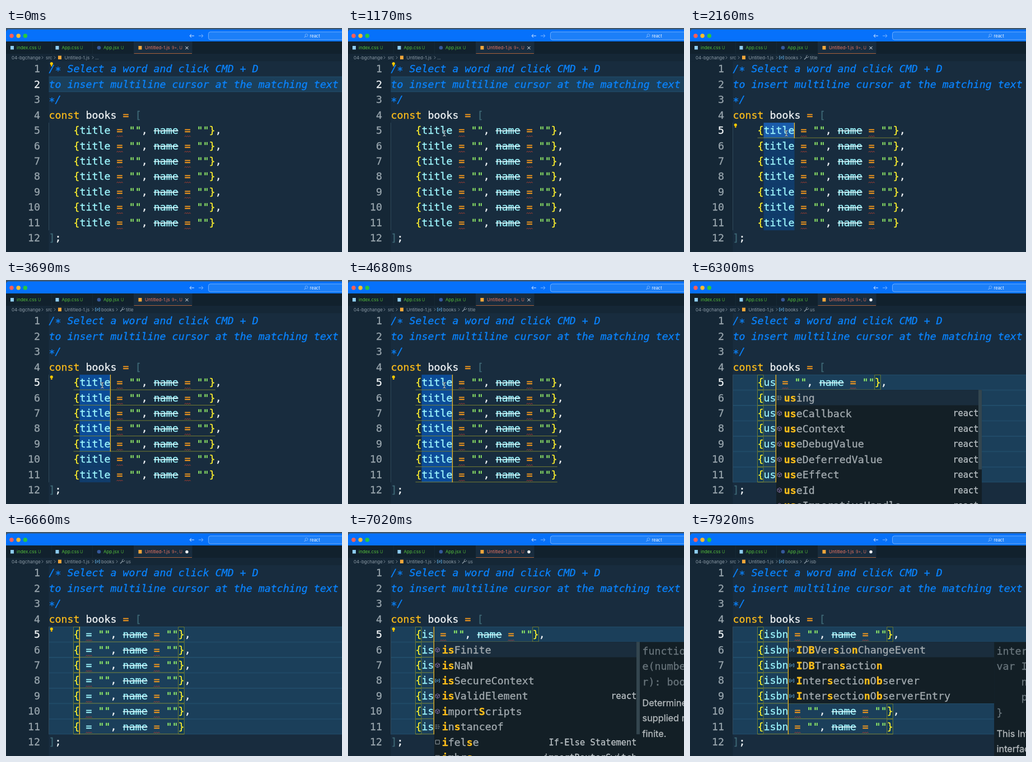
Write an HTML page with a canvas that moves like this. It is 600 px wide and 400 px high and loops after 8000 ms.

```html
<!DOCTYPE html>
<html lang="en">
<head>
<meta charset="utf-8">
<title>Multiline cursor</title>
<style>
html, body { margin: 0; width: 100%; height: 100%; overflow: hidden; background: #182c3e; }
canvas { display: block; width: 600px; height: 400px; }
</style>
</head>
<body>
<canvas id="stage"></canvas>
<script>
const LOOP = 8000, CW = 11.01, LH = 27.45, X0 = 76.5;
const MONO = '"DejaVu Sans Mono", monospace', SANS = 'Inter, sans-serif';
const CODE = `18.29px ${MONO}`, DETAIL = `15.35px ${MONO}`, UI = `8px ${SANS}`;
const INK = 0.3; // extra stroke that thickens code glyphs
const C = {
  bg: '#182c3e', gutter: '#152736', tabs: '#11212d', blue: '#0671fb', line: '#1b3f5a',
  edge: '#24506e', comment: '#0a84ff', gold: '#ffbe1a', orange: '#f99a1c', yellow: '#fff02e',
  cyan: '#9ef7ff', green: '#97f56a', white: '#f2f6f8', dim: '#3c6674', num: '#98a5ad',
  olive: '#7f8530', match: '#0d3a58', panel: '#131f26', picked: '#1a2d3d', grey: '#a3abb0',
  tabGreen: '#55c23c', salmon: '#ee7560', crumb: '#8b9aa5'
};

// Timelines: [start, value]
const WORDS = [[0, 'title'], [5040, ''], [5940, 'u'], [6120, 'us'], [6570, 'u'], [6660, ''],
  [6840, 'i'], [6930, 'is'], [7380, 'isb'], [7650, 'isbn']];
const CRUMBS = [[0, ''], [1350, 'title'], [6210, 'us'], [7200, 'is'], [7560, 'isb']];
const PICKS = [[0, 0], [1440, 1], [2610, 2], [2880, 3], [3150, 4], [3420, 5], [3780, 6], [4050, 7], [5040, 0]];
const CLICK = 1260, DELETE = 5040;

// Suggestions: [icon, label, detail]
const hooks = ['useCallback', 'useContext', 'useDebugValue', 'useDeferredValue', 'useEffect', 'useId', 'useImperativeHandle'];
const LISTS = {
  u: [['key', 'using'], ...hooks.map(h => ['cube', h, 'react'])],
  i: [['cube', 'isFinite'], ['cube', 'isNaN'], ['var', 'isSecureContext'], ['cube', 'isValidElement', 'react'],
    ['cube', 'importScripts'], ['key', 'instanceof'], ['box', 'ifelse', 'If-Else Statement'], ['box', 'imbrs', 'importRouterSwitch']],
  isb: ['IDBVersionChangeEvent', 'IDBTransaction', 'IntersectionObserver', 'IntersectionObserverEntry'].map(s => ['var', s])
};

const canvas = document.getElementById('stage');
const ratio = window.devicePixelRatio || 1;
canvas.width = 600 * ratio;
canvas.height = 400 * ratio;
const g = canvas.getContext('2d');

const at = (list, t) => list.filter(e => e[0] <= t).pop()[1];
const rowTop = n => 59.3 + LH * (n - 1);
const col = n => X0 + CW * n;

function rect(x, y, w, h, fill) {
  g.fillStyle = fill;
  g.fillRect(x, y, w, h);
}
function frame(x, y, w, h, color, lw = 1) {
  g.strokeStyle = color;
  g.lineWidth = lw;
  g.strokeRect(x, y, w, h);
}
function dot(x, y, r, fill) {
  g.fillStyle = fill;
  g.beginPath();
  g.arc(x, y, r, 0, 7);
  g.fill();
}
function path(pts, color, lw = 1, close = false) {
  g.strokeStyle = color;
  g.lineWidth = lw;
  g.beginPath();
  pts.forEach(p => g.lineTo(p[0], p[1]));
  if (close) g.closePath();
  g.stroke();
}
function text(s, x, y, color, font = UI, align = 'left', ink = 0) {
  g.font = font;
  g.fillStyle = g.strokeStyle = color;
  g.textAlign = align;
  g.fillText(s, x, y);
  if (!ink) return;
  g.lineWidth = ink;
  g.strokeText(s, x, y);
}
// Code text on the character grid
function code(s, x, n, color, style = '') {
  text(s, x, rowTop(n) + 20, color, style + CODE, 'left', INK);
}

function chevron(x, y) {
  path([[x - 1.2, y - 2.5], [x + 1.2, y], [x - 1.2, y + 2.5]], C.crumb, 0.8);
}
function cross(x, y, r, color) {
  path([[x - r, y - r], [x + r, y + r]], color);
  path([[x + r, y - r], [x - r, y + r]], color);
}
function arrow(x, y, dir, color) {
  path([[x - 4 * dir, y], [x + 4 * dir, y]], color);
  path([[x + dir, y - 3], [x + 4 * dir, y], [x + dir, y + 3]], color);
}
function varIcon(x, y) {
  path([[x - 2.2, y - 2.8], [x - 3.8, y - 2.8], [x - 3.8, y + 2.8], [x - 2.2, y + 2.8]], '#62b0e8', 0.9);
  path([[x + 2.2, y - 2.8], [x + 3.8, y - 2.8], [x + 3.8, y + 2.8], [x + 2.2, y + 2.8]], '#62b0e8', 0.9);
  g.beginPath();
  g.ellipse(x, y, 1.8, 1.3, -0.5, 0, 7);
  g.stroke();
}
function icon(kind, x, y) {
  if (kind === 'var') varIcon(x, y);
  if (kind === 'box') frame(x - 3.5, y - 3.5, 7, 7, '#a9b2b8', 0.9);
  if (kind === 'key') {
    for (const d of [-3, 0, 3]) {
      path([[x - 4, y + d], [x - 0.5, y + d]], '#a9b2b8', 0.9);
      path([[x + 0.7, y + d], [x + 4 - Math.abs(d) / 3, y + d]], '#a9b2b8', 0.9);
    }
  }
  if (kind === 'cube') {
    const p = '#9479b4';
    path([[x, y - 4], [x + 3.6, y - 2], [x + 3.6, y + 2], [x, y + 4], [x - 3.6, y + 2], [x - 3.6, y - 2]], p, 0.9, true);
    path([[x - 3.6, y - 2], [x, y], [x + 3.6, y - 2]], p, 0.9);
    path([[x, y], [x, y + 4]], p, 0.9);
  }
}

function drawTitleBar() {
  rect(0, 0, 600, 8, '#3f566b');
  g.fillStyle = C.blue;
  g.beginPath();
  g.roundRect(0, 2.5, 620, 30, 5);
  g.fill();
  ['#ff5f57', '#febc2e', '#28c840'].forEach((c, i) => dot(10 + 12.2 * i, 14, 3.7, c));
  arrow(332, 14, -1, '#d5e7ff');
  arrow(348, 14, 1, '#7fb5fb');
  g.beginPath();
  g.roundRect(361.5, 7, 270, 14, 3.5);
  g.fillStyle = '#1c7ff8';
  g.fill();
  g.strokeStyle = '#79b4ff';
  g.lineWidth = 0.9;
  g.stroke();
  g.beginPath();
  g.arc(536.5, 13, 2.4, 0, 7);
  g.stroke();
  path([[534.8, 14.8], [532.6, 17]], '#a9cfff');
  text('react', 542.5, 17, '#f3f8ff', `7.5px ${SANS}`);
}

function drawTabs(edited) {
  rect(0, 24, 600, 22, C.tabs);
  rect(228, 24, 104, 22, C.bg);
  rect(228, 45, 104, 1, '#a8613c');
  for (const x of [81, 154, 228, 332]) rect(x, 24, 0.6, 22, '#1a2d3b');
  rect(8, 32, 6, 6.5, '#8ecdf0');
  rect(88.5, 32, 6, 6.5, '#8ecdf0');
  dot(166, 35.3, 3.3, '#35589a');
  rect(236.5, 32, 6, 6.5, '#f2a63a');
  [['index.css', 19, 57], ['App.css', 99.5, 132], ['App.jsx', 174, 205]].forEach(([s, x, u]) => {
    text(s, x, 38.3, C.tabGreen);
    text('U', u, 38.3, '#4aa336', `7.3px ${SANS}`);
  });
  text('Untitled-1.js', 248, 38.3, C.salmon);
  text('9+, U', 296, 38.3, '#cf6a58', `7.3px ${SANS}`);
  if (edited) dot(323, 35.5, 2.7, C.white);
  else cross(323, 35.5, 2.6, C.white);
}

function drawCrumbs(name) {
  rect(0, 46, 600, 13.3, C.gutter);
  const y = 55.6;
  text('04-bgchange', 10, y, C.crumb);
  chevron(65, 52.8);
  text('src', 71, y, C.crumb);
  chevron(87, 52.8);
  rect(93, 49.5, 6, 6.5, '#f2a63a');
  text('Untitled-1.js', 104.5, y, C.crumb);
  chevron(155, 52.8);
  if (!name) {
    text('...', 159, y, C.crumb);
    return;
  }
  varIcon(163.5, 52.8);
  text('books', 170, y, C.crumb);
  chevron(198, 52.8);
  path([[204, 56.3], [208.5, 51.8]], C.crumb, 1.5);
  g.beginPath();
  g.arc(209.5, 51, 2, -0.3, 4.9);
  g.strokeStyle = C.crumb;
  g.lineWidth = 1;
  g.stroke();
  text(name, 214, y, C.crumb);
}

function bulb(y) {
  dot(81.3, y - 1, 2.6, '#ffcc00');
  rect(80, y + 1.3, 2.6, 2.7, '#e0ae00');
}

function highlight(n) {
  rect(X0, rowTop(n), 600, LH, C.line);
  rect(X0, rowTop(n), 600, 0.8, C.edge);
  rect(X0, rowTop(n) + LH - 0.8, 600, 0.8, C.edge);
}

function bracketBox(x, n) {
  rect(x, rowTop(n), CW, LH, C.match);
  frame(x, rowTop(n) + 0.5, CW - 0.5, LH - 1, C.olive, 0.9);
}

function squiggle(x, n) {
  const y = rowTop(n) + 24.3, pts = [];
  for (let i = 0; i <= 6; i++) pts.push([x + i * CW / 6, y + (i % 2 ? -1 : 1)]);
  path(pts, '#b5402f', 0.9);
}

function drawBook(n, word, firstEq) {
  let c = 4;
  const put = (s, color) => {
    code(s, col(c), n, color);
    c += s.length;
  };
  put('{', C.yellow);
  put(word, C.cyan);
  c++;
  squiggle(col(c), n);
  put('=', firstEq);
  c++;
  put('""', C.green);
  put(',', C.white);
  c++;
  const nameX = col(c);
  put('name', C.cyan);
  rect(nameX, rowTop(n) + 13.6, CW * 4, 1.6, '#d9fbff');
  c++;
  squiggle(col(c), n);
  put('=', C.orange);
  c++;
  put('""', C.green);
  put('}', C.yellow);
  if (n < 11) put(',', C.white);
}

function drawEditor(t, word, picks) {
  const typing = t >= DELETE;
  const active = t < CLICK ? 2 : 5;
  rect(0, 59.3, X0, 341, C.gutter);
  rect(X0, 59.3, 600, 341, C.bg);
  if (t < CLICK) highlight(2);
  else if (!typing && !picks) highlight(5);
  for (let n = 5; typing && n <= 11; n++) highlight(n);
  rect(X0 - 0.5, rowTop(5), 1, LH * 7, '#2f485a');

  for (let n = 1; n <= 12; n++)
    text(n, 61, rowTop(n) + 20, n === active ? C.white : C.num, CODE, 'right', INK);

  for (let n = 5; n <= 11 && t >= CLICK && !typing; n++) {
    const chosen = n - 5 < picks;
    rect(col(5), rowTop(n), CW * 5, LH, chosen ? (picks === 1 ? '#1a5cab' : '#0c4c98') : '#103c6b');
  }

  // U+2217 sits on the middle of the line
  code('/∗ Select a word and click CMD + D', X0, 1, C.comment, 'italic ');
  code('to insert multiline cursor at the matching text', X0, 2, C.comment, 'italic ');
  code('∗/', X0, 3, C.comment, 'italic ');
  code('const', X0, 4, C.gold);
  code('books', col(6), 4, C.white);
  code('=', col(12), 4, C.orange);
  code('[', col(14), 4, C.dim);
  code(']', X0, 12, C.dim);
  code(';', col(1), 12, C.white);

  const caret = col(5 + word.length), close = col(21 + word.length);
  for (let n = 5; n <= 11; n++) {
    const y = rowTop(n);
    const here = typing || n - 5 < picks || (n === 5 && t >= CLICK);
    if (typing) {
      bracketBox(col(4), n);
      bracketBox(close, n);
    }
    drawBook(n, word, typing && !word ? C.cyan : C.orange);
    if (!here) continue;
    rect(col(4), y + LH - 0.9, close + CW - col(4), 0.9, C.olive);
    rect(caret - 0.8, y, 1.3, LH, '#f5b921');
  }
  if (t < CLICK) bulb(64.5);
  else if (t > 1620 && !(t > 5940 && t < 6660) && t < 7380) bulb(174);
}

// Positions of the typed letters inside a label
function matches(label, query) {
  const s = label.toLowerCase(), hits = new Set();
  let from = 0;
  [...query].forEach((ch, i) => {
    let k = s.indexOf(ch, from);
    if (k < 0) k = s.indexOf(ch);
    hits.add(k);
    if (i < 2) from = k + 1;
  });
  return hits;
}

function drawDocs(x, mono, prose) {
  rect(x, rowTop(6) - 0.3, 600 - x, 210, C.panel);
  mono.forEach((s, i) => code(s, x + 4.5, 6.08 + i, '#69757c'));
  prose.forEach((s, i) =>
    text(s, x + 4.5, rowTop(6.55 + mono.length + i) + 16.7, '#b4babd', `16.3px ${SANS}`, 'left', INK));
}

function drawPopup(word) {
  if (!word) return;
  const items = LISTS[word.slice(0, 3)] || LISTS[word[0]];
  const x = col(5 + word.length) + 0.5, y = rowTop(6) - 0.3, w = 367;
  rect(x, y, w, items.length * LH, C.panel);
  rect(x, y, w, LH, C.picked);
  items.forEach(([kind, label, detail], i) => {
    const n = 6 + i, hits = matches(label, word);
    icon(kind, x + 5.7, rowTop(n) + 14);
    [...label].forEach((ch, k) => {
      const hit = hits.has(k);
      code(ch, x + 13.6 + k * CW, n + 0.02, hit ? C.gold : C.grey, hit ? 'bold ' : '');
    });
    if (detail) text(detail, x + 361.5, rowTop(n) + 19.3, '#bcc3c7', DETAIL, 'right', INK);
  });
  if (items.length > 4) rect(x + w - 6, y, 6, word[0] === 'u' ? 142 : 165, '#34464f');
  if (word.length > 2)
    drawDocs(x + w, ['interface', 'var Inter', '    new', '    prot', '}'], ['This Intersection', 'interface of']);
  else if (word === 'is')
    drawDocs(x + w, ['function', 'e(number', 'r): bool'], ['Determines', 'supplied number', 'finite.']);
}

function drawMouse(t) {
  if (t < 90 || t >= DELETE) return;
  const p = Math.min(1, (t - 90) / 900), k = 1 - (1 - p) ** 3;
  const x = 200 - 28 * k, y = 394 - 206 * k;
  for (const [color, lw] of [['#1c2b38', 2.2], ['#e4e9ec', 1]]) {
    path([[x, y - 4], [x, y + 4]], color, lw);
    path([[x - 2.5, y - 5], [x, y - 4], [x + 2.5, y - 5]], color, lw);
    path([[x - 2.5, y + 5], [x, y + 4], [x + 2.5, y + 5]], color, lw);
  }
}

function draw() {
  const t = performance.now() % LOOP;
  const word = at(WORDS, t);
  g.setTransform(ratio, 0, 0, ratio, 0, 0);
  g.lineJoin = 'round';
  drawTitleBar();
  drawTabs(t >= DELETE);
  drawCrumbs(at(CRUMBS, t));
  drawEditor(t, word, at(PICKS, t));
  if (t >= DELETE) drawPopup(word);
  drawMouse(t);
  requestAnimationFrame(draw);
}
draw();
</script>
</body>
</html>
```
